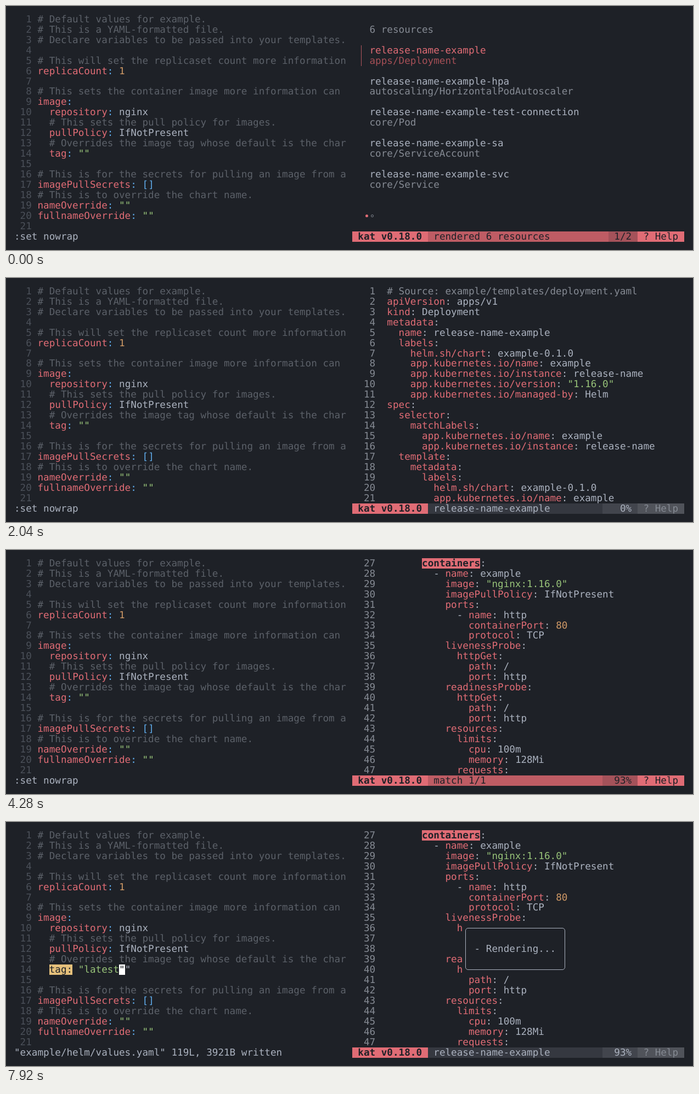
Animation, 1252 px wide and 447 px high, one loop 8 s. Source, as an HTML page:

```html
<!DOCTYPE html>
<html lang="en">
<head>
<meta charset="utf-8">
<title>Chart rendering in a terminal</title>
<style>
  html, body { margin: 0; width: 100%; height: 100%; overflow: hidden; background: #1e2127; }
  #screen {
    position: relative; width: 1252px; height: 447px; overflow: hidden;
    font: 17.632px "DejaVu Sans Mono", "Liberation Mono", monospace;
    text-rendering: geometricPrecision; font-variant-ligatures: none;
    color: #abb2bf;
  }
  /* The taller line sets the text 1px lower inside its cell. */
  #screen > * { position: absolute; white-space: pre; height: 18.97px; line-height: 20.97px; }
  u { text-underline-offset: 2px; text-decoration-thickness: 1px; }
  .num { color: #4b5059; }
  .com { color: #5c6169; }
  .dim { color: #858a93; }
  .key { color: #e06c75; }
  .sub { color: #a54f56; }
  .str { color: #98c379; }
  .int { color: #d19a66; }
  .op { color: #61afef; }
  .hl { background: #e5c07b; color: #1e2127; }
  .hit, .logo { background: #e06c75; color: #1e2127; font-weight: bold; }
  .note { background: #be5c64; color: #1e2127; }
  .pos { background: #a4525a; color: #1e2127; }
  .help { background: #e06c75; color: #1e2127; }
  .quiet.note { background: #353840; color: #abb2bf; }
  .quiet.pos { background: #42454d; color: #abb2bf; }
  .quiet.help { background: #50535a; color: #858a93; }
  .prompt { background: #a54f56; }
  .block { background: #fff; color: #1e2127; }
  #screen > .caret { width: 1.5px; background: #fff; }
  #screen > .mark { width: 1px; height: 38px; background: #b3555d; }
  #screen > .dot { width: 5px; height: 5px; border-radius: 50%; background: #e06c75; box-sizing: border-box; }
  #screen > .ring { background: none; border: 1px solid #858a93; }
  #screen > .popup { width: 191px; height: 94.85px; background: #1e2127; }
  .popup::after {
    content: ""; position: absolute; left: 5px; top: 9px; width: 180px; height: 75px;
    border: 1px solid #abb2bf; border-radius: 5px;
  }
</style>
</head>
<body>
<div id="screen"></div>
<script>
const LOOP = 8000, X0 = 15, Y0 = 14.7, CELL = 10.615, ROW = 18.97;
const PANE = 58, LAST = 21;

const values = `# Default values for example.
# This is a YAML-formatted file.
# Declare variables to be passed into your templates.

# This will set the replicaset count more information
replicaCount: 1

# This sets the container image more information can
image:
  repository: nginx
  # This sets the pull policy for images.
  pullPolicy: IfNotPresent
  # Overrides the image tag whose default is the char
  tag: ""

# This is for the secrets for pulling an image from a
imagePullSecrets: []
# This is to override the chart name.
nameOverride: ""
fullnameOverride: ""
`.split("\n");

const docTop = `# Source: example/templates/deployment.yaml
apiVersion: apps/v1
kind: Deployment
metadata:
  name: release-name-example
  labels:
    helm.sh/chart: example-0.1.0
    app.kubernetes.io/name: example
    app.kubernetes.io/instance: release-name
    app.kubernetes.io/version: "1.16.0"
    app.kubernetes.io/managed-by: Helm
spec:
  selector:
    matchLabels:
      app.kubernetes.io/name: example
      app.kubernetes.io/instance: release-name
  template:
    metadata:
      labels:
        helm.sh/chart: example-0.1.0
        app.kubernetes.io/name: example`.split("\n");

const docMatch = `      containers:
        - name: example
          image: "nginx:1.16.0"
          imagePullPolicy: IfNotPresent
          ports:
            - name: http
              containerPort: 80
              protocol: TCP
          livenessProbe:
            httpGet:
              path: /
              port: http
          readinessProbe:
            httpGet:
              path: /
              port: http
          resources:
            limits:
              cpu: 100m
              memory: 128Mi
            requests:`.split("\n");

const resources = [
  ["release-name-example", "apps/Deployment"],
  ["release-name-example-hpa", "autoscaling/HorizontalPodAutoscaler"],
  ["release-name-example-test-connection", "core/Pod"],
  ["release-name-example-sa", "core/ServiceAccount"],
  ["release-name-example-svc", "core/Service"],
];

const put = (row, col, text, cls = "", dx = 0, dy = 0) =>
  `<span class="${cls}" style="left:${(X0 + col * CELL + dx).toFixed(2)}px;top:${(Y0 + row * ROW + dy).toFixed(2)}px">${text}</span>`;

// Places [text, class] pieces one after another.
function run(row, col, parts) {
  let html = "";
  for (const [text, cls] of parts) {
    if (text) html += put(row, col, text, cls);
    col += text.length;
  }
  return html;
}

// The part of the text typed by time t; pace is in ticks of 40 ms per key.
function typed(text, t, start, pace = 1.5) {
  let n = 0;
  while (n < text.length && t >= start + 40 * Math.floor(n * pace)) n++;
  return text.slice(0, n);
}

const latest = (table, t) => table.filter(([at]) => t >= at).pop().slice(1);

const valueClass = v =>
  v[0] === '"' ? "str" : v[0] === "[" ? "op" : /^\d+$/.test(v) ? "int" : "";

function yaml(line, comment, colon) {
  if (/^ *#/.test(line)) return [[line, comment]];
  const m = line.match(/^( *(?:- )?)([\w./-]+)(:)( ?)(.*)$/);
  if (!m) return [[line, ""]];
  return [[m[1], ""], [m[2], "key"], [m[3], colon], [m[4], ""], [m[5], valueClass(m[5])]];
}

function tagLine(t) {
  const text = typed('latest"', t, 6360);
  const parts = [["  ", ""]];
  if (t >= 5640) parts.push(["tag:", "hl"]);
  else parts.push(["tag", "key"], [":", "op"]);
  parts.push([" ", ""]);
  if (text.endsWith('"')) parts.push([`"${text}`, "str"], ['"', ""]);
  else parts.push([`"${text}"`, "str"]);
  return parts;
}

function editor(t) {
  let html = values.map((line, i) =>
    put(i, 0, String(i + 1).padStart(3), "num") +
    run(i, 4, i === 13 ? tagLine(t) : yaml(line, "com", "op"))).join("");

  const [command] = latest([
    [0, ":set nowrap"], [4880, "/"], [4920, "/t"], [4960, "/ta"], [5040, "/tag"], [5080, "/tag:"],
    [6040, "-- INSERT --"], [7240, ""], [7320, ":"], [7360, ":w"],
    [7920, '"example/helm/values.yaml" 119L, 3921B written'],
  ], t);
  html += put(LAST, 0, command);

  const [row, col, char] = latest([
    [0], [4800, 0, 4, "#"], [4880, LAST, command.length, " "],
    [5640, 13, 6, "t"], [5760, 13, 11, '"'], [6040],
    [7240, 13, 18, '"'], [7320, LAST, command.length, " "], [7920, 13, 18, '"'],
  ], t);
  if (char) html += put(row, col, char, "block");
  if (t >= 6040 && t < 7240) html += put(13, 12 + typed('latest"', t, 6360).length, "", "caret");
  return html;
}

function status(note, pos, quiet) {
  const q = quiet ? "quiet " : "";
  const width = 36 - pos.length - 2;
  return run(LAST, PANE, [
    [" kat v0.18.0 ", "logo"],
    [(" " + note).padEnd(width), q + "note"],
    [` ${pos} `, q + "pos"],
    [" ? Help ", q + "help"],
  ]);
}

const prompt = (row, col, label, text) =>
  run(row, col, [[label, "key"], [" " + text, ""], [" ", "prompt"]]);

// Positions of the query letters in order, or null.
function fuzzy(text, query) {
  const hits = [];
  let from = 0;
  for (const c of query) {
    const i = text.toLowerCase().indexOf(c, from);
    if (i < 0) return null;
    hits.push(i);
    from = i + 1;
  }
  return hits;
}

function underline(text, hits) {
  const html = [...text].map((c, i) => hits.includes(i) ? `<u>${c}</u>` : c).join("");
  return html.replaceAll("</u><u>", "");
}

function list(t) {
  const finding = t >= 480;
  const query = t < 1000 ? "" : "d" + typed("eployment", t, 1080, 1.375);
  const filter = t < 1040 ? "" : query;
  const items = resources
    .map(([name, kind]) => ({ name, kind, hits: fuzzy(kind, filter) }))
    .filter(item => item.hits);
  if (filter) items.sort((a, b) => a.hits[0] - b.hits[0]);

  let html = finding ? prompt(1, 61, "Find:", query) : put(1, 61, "6 resources", "dim");
  items.forEach(({ name, kind, hits }, i) => {
    const row = 3 + 3 * i;
    const chosen = i === 0 && (!finding || items.length === 1);
    const idle = finding && !query ? "dim" : "";
    if (chosen) html += put(row, 59.5, "", "mark");
    html += put(row, 61, name, chosen ? "key" : idle);
    html += put(row + 1, 61, underline(kind, hits), chosen ? "sub" : "dim");
  });

  const paged = query.length < 2;
  if (paged) html += put(19, 60.5, "", "dot", -2.5, 7) + put(19, 61.5, "", "dot ring", -2.5, 7);
  const quiet = t >= 1320;
  const note = quiet ? "helm: helm template . --gener…" : "rendered 6 resources";
  return html + status(note, paged ? "1/2" : "1/1", quiet);
}

function viewer(t) {
  const matched = t >= 4280;
  const first = matched ? 27 : 1;
  let html = (matched ? docMatch : docTop).map((line, i) => {
    const parts = yaml(line, "dim", "");
    if (matched && i === 0) parts[1][1] = "hit";
    return put(i, PANE, String(first + i).padStart(4), "dim") + run(i, 64, parts);
  }).join("");

  if (t >= 2600 && t < 4200) html += prompt(LAST, PANE, "Search:", typed("containers", t, 3120));
  else if (matched && t < 7280) html += status("match 1/1", " 93%", false);
  else html += status("release-name-example", matched ? " 93%" : "  0%", true);

  if (t >= 7920) html += put(9, 77, "", "popup") + put(11, 79, "- Rendering...");
  return html;
}

const screenEl = document.getElementById("screen");
const start = performance.now();
let shown = "";

function frame(now) {
  const t = Math.max(0, now - start) % LOOP;
  const html = editor(t) + (t < 2040 ? list(t) : viewer(t));
  if (html !== shown) screenEl.innerHTML = shown = html;
  requestAnimationFrame(frame);
}
frame(start);
</script>
</body>
</html>
```
